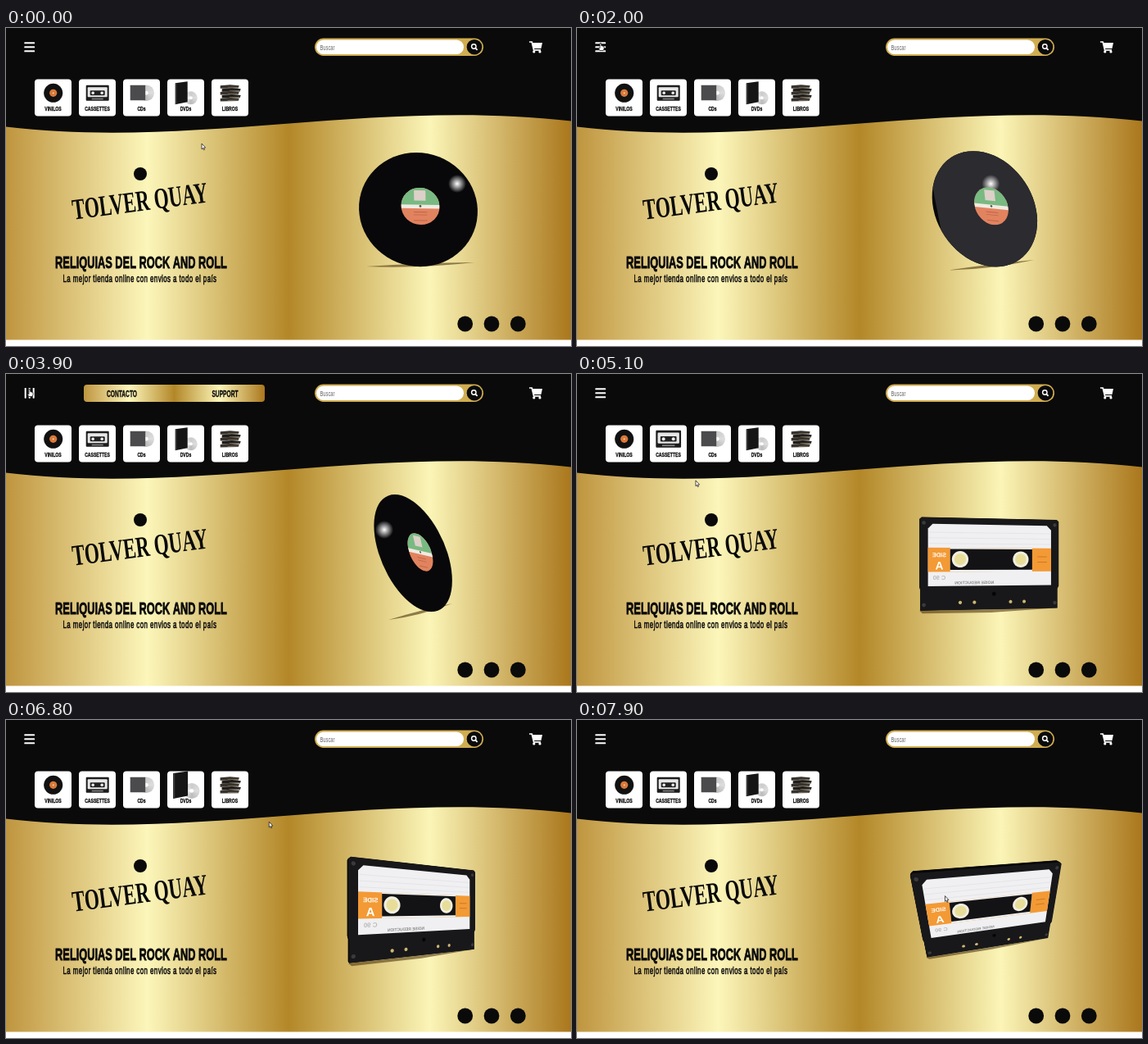
Recreate the animation shown at these times as an HTML page with a canvas. Size 690 by 388 pixels, loop 8 s.

```html
<!DOCTYPE html>
<html lang="es">
<head>
<meta charset="utf-8">
<title>Reliquias del rock and roll</title>
<style>
html, body { margin: 0; width: 100%; height: 100%; overflow: hidden; background: #fff; }
canvas { display: block; }
</style>
</head>
<body>
<canvas id="stage" width="690" height="388"></canvas>
<script>
const g = document.getElementById('stage').getContext('2d');
const LOOP = 8000, INK = '#0a0a0a', NARROW = 0.64, TAU = Math.PI * 2, DEG = Math.PI / 180;
const SPIN = 12.7; // turntable speed, degrees per second
const SANS = '"Liberation Sans", Arial, sans-serif';
const SERIF = '"Liberation Serif", Times, serif';

const clamp = k => Math.max(0, Math.min(1, k));
const ramp = (t, from, to) => clamp((t - from) / (to - from));
const mix = (a, b, k) => a + (b - a) * k;

function group(draw) { g.save(); draw(); g.restore(); }

function gold(x0, x1) {
  const fill = g.createLinearGradient(x0, 0, x1, 0);
  ['#bf953f', '#fcf6ba', '#b38728', '#fbf5b7', '#aa771c'].forEach((c, i) => fill.addColorStop(i / 4, c));
  return fill;
}

function box(x, y, w, h, r, fill) {
  g.fillStyle = fill;
  g.beginPath();
  g.roundRect(x, y, w, h, r);
  g.fill();
}

function disc(x, y, r, fill) {
  g.fillStyle = fill;
  g.beginPath();
  g.arc(x, y, r, 0, TAU);
  g.fill();
}

function clipDisc() {
  g.beginPath();
  g.arc(0, 0, 1, 0, TAU);
  g.clip();
}

function poly(points, fill) {
  g.fillStyle = fill;
  g.beginPath();
  points.forEach(p => g.lineTo(...p));
  g.closePath();
  g.fill();
}

function line(points, width, color) {
  g.lineWidth = width;
  g.strokeStyle = color;
  g.beginPath();
  points.forEach(p => g.lineTo(...p));
  g.stroke();
}

// Condensed lettering: one ratio for every string.
function text(s, x, y, size, { weight = 'bold', family = SANS, color = INK, align = 'center', thicken = 0, gap = 0 } = {}) {
  group(() => {
    g.translate(x, y);
    g.scale(NARROW, 1);
    g.font = `${weight} ${size}px ${family}`;
    g.letterSpacing = gap + 'px';
    g.textAlign = align;
    g.fillStyle = g.strokeStyle = color;
    g.fillText(s, 0, 0);
    g.lineWidth = thicken;
    if (thicken) g.strokeText(s, 0, 0);
  });
}

function backdrop() {
  g.fillStyle = '#fff';
  g.fillRect(0, 0, 690, 388);
  g.fillStyle = gold(0, 690);
  g.fillRect(0, 0, 690, 380.5);
  g.fillStyle = INK;
  g.beginPath();
  g.moveTo(0, 0);
  g.lineTo(0, 120.5);
  g.bezierCurveTo(230, 148, 445, 86, 690, 113.5);
  g.lineTo(690, 0);
  g.fill();
}

function header(t) {
  const open = ramp(t, 2100, 2500) - ramp(t, 4100, 4400);
  group(() => {
    g.translate(28.7, 23.3);
    g.rotate(open * TAU / 4);
    for (const y of [-5, 0, 5]) box(-6.4, y - 1, 12.8, 2, 0.6, '#fff');
  });
  group(() => {
    g.globalAlpha = open;
    box(95, 13, 221, 21, 4, gold(95, 316));
    text('CONTACTO', 141.5, 27.7, 10.4, { thicken: 0.3 });
    text('SUPPORT', 267.5, 27.7, 10.4, { thicken: 0.3 });
  });

  box(377, 12.5, 206, 21.5, 10.7, '#d0ad50');
  box(379, 14.5, 180, 17.5, 8.7, '#fff');
  text('Buscar', 383.5, 26.5, 9, { weight: '', color: '#666', align: 'left' });
  disc(572, 23.2, 9.3, INK);
  disc(571.3, 22.5, 3.4, '#fff');
  disc(571.3, 22.5, 1.9, INK);
  line([[573.2, 24.4], [575.6, 26.8]], 1.8, '#fff');

  // cart
  line([[639, 17], [642.2, 17], [644.6, 26.8], [653, 26.8]], 1.7, '#fff');
  poly([[642.5, 18], [655, 18], [653.5, 25], [644, 25]], '#fff');
  for (const x of [644.8, 652]) disc(x, 28.9, 1.6, '#fff');
}

function shinyDisc(x, y, r) {
  const sheen = g.createConicGradient(0, x, y);
  ['#ddd', '#bbb', '#f4f4f4', '#ccc', '#ddd'].forEach((c, i) => sheen.addColorStop(i / 4, c));
  disc(x, y, r, sheen);
  disc(x, y, r / 4, '#fff');
}

const cards = {
  VINILOS() {
    disc(0, 0, 11.5, '#111');
    disc(0, 0, 4.6, '#d9793a');
    disc(0, 0, 0.9, '#f4e4c0');
  },
  CASSETTES() {
    box(-14, -9.5, 28, 19, 1, '#1c1c1c');
    box(-12, -7, 24, 12, 1, '#e6e6e6');
    box(-9, -3, 18, 6, 1, '#222');
    for (const x of [-5.5, 5.5]) disc(x, 0, 1.8, '#eee');
    box(-7, 6.5, 14, 1.5, 0, '#888');
  },
  CDs() {
    shinyDisc(5.5, 0, 9.8);
    box(-14, -9.5, 18.5, 18.5, 0.5, '#4b4b4d');
  },
  DVDs() {
    shinyDisc(6, 6, 8);
    poly([[-13, -12], [2, -14], [2, 11], [-13, 14]], '#151515');
    line([[-12, -12], [-12, 13.5]], 1.5, '#3a3a3a');
  },
  LIBROS() {
    for (let i = 0; i < 5; i++) {
      const x = -12 + i % 2 * 2, y = -9 + i * 3.9;
      poly([[x, y], [x + 12, y - 1], [x + 23, y], [x + 22, y + 3.2], [x, y + 3.5]], i % 2 ? '#1f1d1b' : '#38322b');
      line([[x + 9, y + 2.6], [x + 22, y + 2.2]], 0.6, '#a5997f');
    }
  }
};

const cardLeft = i => 35 + 54 * i;
const overCard = ([x, y], i) => Math.abs(x - cardLeft(i) - 22.5) < 22.5 && Math.abs(y - 85) < 22.5;

const path = [
  [0, 239, 141], [1000, 239, 141], [1800, 28, 18.5], [4500, 28, 18.5], [5100, 145, 130],
  [5700, 112, 90], [6740, 225, 92], [6800, 321, 124], [7300, 440, 200], [LOOP, 451, 217]
];

function pointer(t) {
  const i = Math.max(1, path.findIndex(p => p[0] >= t));
  const [t0, x0, y0] = path[i - 1], [t1, x1, y1] = path[i], k = ramp(t, t0, t1);
  return [mix(x0, x1, k), mix(y0, y1, k)];
}

// A card's picture grows with the time spent on it over the last 200 ms.
function lift(t, i) {
  let sum = 0;
  for (let past = 0; past < 200; past += 10) sum += overCard(pointer(t - past), i) / 20;
  return sum;
}

function categories(t) {
  Object.entries(cards).forEach(([name, icon], i) => {
    const x = cardLeft(i), size = 1 + 0.28 * lift(t, i);
    box(x, 62.5, 45, 45, 4, '#fff');
    text(name, x + 22.5, 100.7, 8, { thicken: 0.3 });
    group(() => {
      g.translate(x + 22.7, 79.3);
      g.scale(size, size);
      icon();
    });
  });
}

function hero() {
  disc(164, 178, 8, INK);
  group(() => {
    g.translate(165, 223);
    g.rotate(-0.13);
    text('TOLVER QUAY', 0, 0, 36, { family: SERIF });
  });
  text('RELIQUIAS DEL ROCK AND ROLL', 165, 293, 20, { thicken: 0.8 });
  text('La mejor tienda online con envios a todo el país', 163.5, 310, 12.4, { weight: '', thicken: 0.6, gap: 0.65 });
  for (const x of [560.7, 593, 625.3]) disc(x, 361, 9.4, INK);
}

function record(t) {
  const s = t / 1000, angle = (5 + SPIN * s) * DEG, k = s / 3.9;
  const cx = 497 + 6.5 * Math.exp(-s), cy = 221.6 - 0.2 * s * s;
  const a = 72.7 * Math.cos(angle), b = 27.5 * Math.sin(angle), d = 69.6 + 0.5 * s;

  // contact shadow
  const l = [440 + 27 * k, 291 + 9 * k], r = [572 - 27 * k, 286 - 6 * k];
  const mid = [(l[0] + r[0]) / 2, (l[1] + r[1]) / 2];
  g.fillStyle = 'rgba(90,65,20,.65)';
  g.beginPath();
  g.moveTo(...l);
  g.quadraticCurveTo(mid[0], mid[1] + 5, ...r);
  g.quadraticCurveTo(mid[0], mid[1] - 2, ...l);
  g.fill();

  group(() => {
    g.transform(a, 0, b, d, cx, cy);
    disc(0, 0, 1, '#08080a');
    clipDisc();
    // grey light that withdraws to the left
    const edge = Math.min(1, 1 - 1.38 * (s - 2.5));
    g.globalAlpha = ramp(t, 700, 1600);
    g.fillStyle = '#2b2b30';
    g.fillRect(-0.93, -1, Math.max(0, edge + 0.93), 2);
    g.globalAlpha = 1;

    g.setTransform(1, 0, 0, 1, 0, 0);
    const x = 551 - 22.8 * s, y = 190;
    const glow = g.createRadialGradient(x, y, 0, x, y, 11);
    glow.addColorStop(0, '#fff');
    glow.addColorStop(0.25, 'rgba(255,255,255,.75)');
    glow.addColorStop(1, 'rgba(255,255,255,0)');
    disc(x, y, 11, glow);
  });

  group(() => {
    g.transform(a, 0, b, d, 506, 217.4);
    g.rotate(0.18 * Math.sin(angle));
    g.scale(0.325, 0.325);
    clipDisc();
    box(-1, -1, 2, 2, 0, '#e2835f');
    box(-1, -1, 2, 0.95, 0, '#79b982');
    box(-1, -0.08, 2, 0.2, 0, '#f0ebe2');
    box(-0.32, -0.85, 0.6, 0.55, 0, '#ddd0c8');
    for (const y of [0.3, 0.45, 0.75]) box(-0.35, y, 0.7, 0.04, 0, '#bd6548');
    disc(0, 0, 0.06, '#554');
  });
}

// A box on the turntable, seen in perspective; a drag turns and tilts it at the end.
function cassette(t) {
  const W = 168, H = 109, DEPTH = 8, EYE = 253;
  const drag = ramp(t, 7250, 7900);
  const yaw = mix(Math.max(0, SPIN * (t / 1000 - 4.68)), 14, drag) * DEG, tilt = 29 * drag * DEG;

  const at = (u, v, z = DEPTH / 2) => {
    const x = (u - 0.5) * W, y = (v - 0.5) * H;
    const px = x * Math.cos(yaw) + z * Math.sin(yaw), depth = z * Math.cos(yaw) - x * Math.sin(yaw);
    const py = y * Math.cos(tilt) + depth * Math.sin(tilt);
    const near = EYE / (EYE - depth * Math.cos(tilt) + y * Math.sin(tilt));
    return [505.5 + px * near, 231.7 + py * near];
  };
  const shape = (points, fill, z) => poly(points.map(p => at(...p, z)), fill);
  const rect = (u0, v0, u1, v1, fill) => shape([[u0, v0], [u1, v0], [u1, v1], [u0, v1]], fill);
  const oval = (u, v, r, fill) => shape(Array.from({ length: 32 }, (_, i) =>
    [u + r * Math.cos(i * TAU / 32), v + r * W / H * Math.sin(i * TAU / 32)]), fill);
  const print = (s, u, v, size, color, flip = 1) => group(() => {
    const o = at(u, v), x = at(u + 1 / W, v), y = at(u, v + 1 / H);
    g.transform(flip * (x[0] - o[0]), flip * (x[1] - o[1]), y[0] - o[0], y[1] - o[1], ...o);
    g.font = `bold ${size}px ${SANS}`;
    g.textAlign = 'center';
    g.fillStyle = color;
    g.fillText(s, 0, 0);
  });

  shape([[0, 1], [0.97, 1], [0.5, 1.035], [0.02, 1.03]], 'rgba(80,55,15,.6)');
  const body = [[0, 0.02], [0.015, 0], [0.985, 0], [1, 0.02], [1, 0.75], [0.99, 0.78], [0.99, 1], [0.005, 1], [0.005, 0.78], [0, 0.75]];
  for (let z = -DEPTH / 2; z <= DEPTH / 2; z++) shape(body, z < DEPTH / 2 ? '#08080a' : '#18181a', z);

  shape([[0.09, 0.07], [0.91, 0.07], [0.942, 0.12], [0.942, 0.74], [0.058, 0.74], [0.058, 0.12]], '#f0f0f2');
  for (const v of [0.16, 0.22, 0.28]) line([at(0.065, v), at(0.935, v)], 0.5, '#d9d9dc');
  rect(0.058, 0.325, 0.942, 0.585, '#f39a35');
  rect(0.21, 0.325, 0.8, 0.585, '#f0f0f2');
  rect(0.21, 0.338, 0.8, 0.565, '#131315');
  for (const u of [0.28, 0.715]) {
    oval(u, 0.45, 0.058, '#f0eee0');
    oval(u, 0.45, 0.04, '#e8dd98');
  }
  print('SIDE', 0.135, 0.425, 7, '#fff', -1);
  print('A', 0.135, 0.56, 13, '#fff');
  print('C 90', 0.135, 0.67, 7, '#bbb', -1);
  print('NOISE REDUCTION', 0.38, 0.72, 5, '#888', -1);
  for (const v of [0.42, 0.48]) line([at(0.84, v), at(0.91, v)], 0.7, '#b86c25');

  oval(0.52, 0.83, 0.014, '#050505');
  for (const u of [0.28, 0.38, 0.64, 0.74]) oval(u, 0.92, 0.012, '#cdb870');
  for (const u of [0.03, 0.97]) for (const v of [0.06, 0.94]) oval(u, v, 0.013, '#3a3a3d');
}

function product(t) {
  const swap = ramp(t, 4200, 4400);
  group(() => {
    g.globalAlpha = 1 - swap;
    if (swap < 1) record(t);
    g.globalAlpha = swap;
    if (swap > 0) cassette(t);
  });
}

function cursor(t) {
  const p = pointer(t);
  const hand = p[0] < 36 && p[1] < 30 || Object.keys(cards).some((_, i) => overCard(p, i));
  const shape = hand
    ? [[0, 0], [1.5, 0], [1.7, 3], [5, 4], [5, 7], [4, 9], [0, 9], [-2, 6], [0, 6]]
    : [[0, 0], [0, 6.8], [1.5, 5.5], [2.5, 7.8], [3.5, 7.3], [2.6, 5.1], [4.6, 5]];
  group(() => {
    g.translate(...p);
    poly(shape, '#fff');
    g.lineWidth = 0.8;
    g.strokeStyle = '#222';
    g.stroke();
  });
}

function frame(now) {
  const t = now % LOOP;
  backdrop();
  header(t);
  categories(t);
  hero();
  product(t);
  cursor(t);
  requestAnimationFrame(frame);
}
requestAnimationFrame(frame);
</script>
</body>
</html>
```
